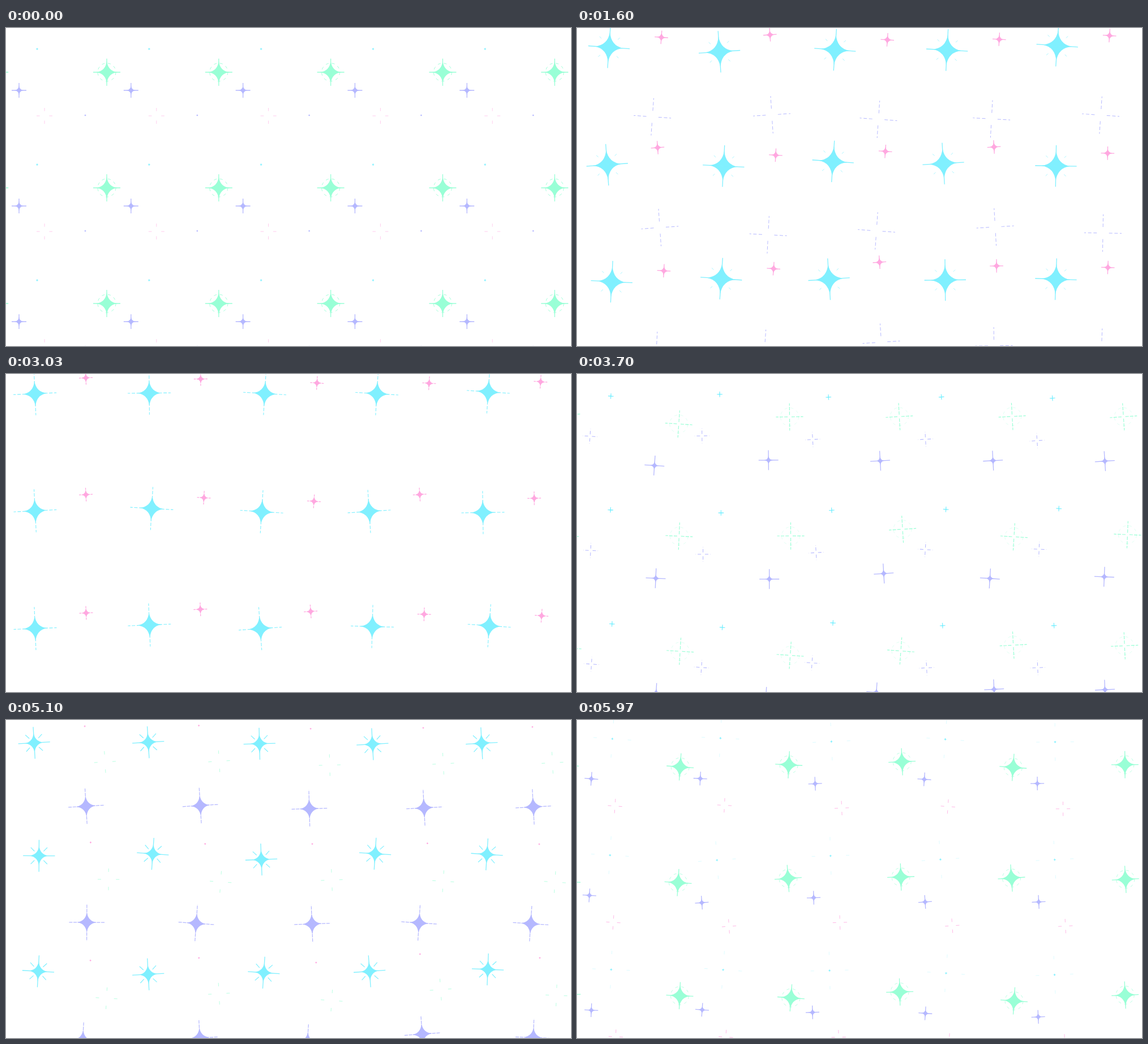
Animation, 998 px wide and 561 px high, one loop 6010 ms. Source, as an HTML page with a canvas:

```html
<!DOCTYPE html>
<html lang="en">
<head>
<meta charset="utf-8">
<title>Twinkling stars</title>
<style>
  html, body { margin: 0; width: 100%; height: 100%; overflow: hidden; background: #fff; }
  canvas { display: block; }
</style>
</head>
<body>
<canvas id="sky" width="998" height="561"></canvas>
<script>
const ctx = document.getElementById('sky').getContext('2d');
const LOOP = 6010, FRAME = 100 / 3, LAST = 179, PERIOD = 1200;
const TILE = { w: 197.8, h: 204, cx: 85, cy: 100 };
const CYAN = '#80f0ff', GREEN = '#99ffd6', LAVENDER = '#b5b8ff', PINK = '#ffa8e0';

// A star grows until `grow`, loses its core from `hold` to `gone`, and its rays scatter until `life`.
const stars = [
  { x: 55, y: 37, color: CYAN, start: 0, grow: 450, hold: 420, gone: 1130, life: 1200,
    size: 29, reach: 38, seed: 2.5, ring: 13, ringAt: 870, burst: true },
  { x: 178, y: 78, color: GREEN, start: 700, grow: 470, hold: 530, gone: 600, life: 900,
    size: 20, reach: 24, ring: 16, ringAt: 510 },
  { x: 23, y: 110, color: LAVENDER, start: 1000, grow: 200, hold: 235, gone: 295, life: 420,
    size: 8.5, reach: 13 },
  { x: 140, y: 154, color: LAVENDER, start: 1170, grow: 250, hold: 300, gone: 425, life: 600,
    size: 22, reach: 33 },
  { x: 146, y: 13, color: PINK, start: 270, grow: 140, hold: 330, gone: 570, life: 700,
    size: 9, reach: 12 },
  { x: 68, y: 155, color: PINK, start: 740, grow: 140, hold: 300, gone: 420, life: 500,
    size: 11, reach: 14 }
];

const ramp = (from, to, v) => Math.min(1, Math.max(0, (v - from) / (to - from)));
const ease = (from, to, v) => {
  const u = ramp(from, to, v);
  return u * u * (3 - 2 * u);
};
const rand = n => {
  const v = Math.sin(n * 127.1 + 3.7) * 43758.5453;
  return v - Math.floor(v);
};

function fillCore(r) {
  const k = r * 0.1, side = r * 0.94;
  ctx.beginPath();
  ctx.moveTo(0, -r);
  ctx.quadraticCurveTo(k, -k, side, 0);
  ctx.quadraticCurveTo(k, k, 0, r);
  ctx.quadraticCurveTo(-k, k, -side, 0);
  ctx.quadraticCurveTo(-k, -k, 0, -r);
  ctx.fill();
}

function spokes(from, to, width) {
  if (to <= from || width <= 0) return;
  ctx.lineWidth = width;
  ctx.beginPath();
  for (let i = 0; i < 4; i++) {
    const dx = Math.cos(i * Math.PI / 2), dy = Math.sin(i * Math.PI / 2);
    ctx.moveTo(dx * from, dy * from);
    ctx.lineTo(dx * to, dy * to);
  }
  ctx.stroke();
}

function drawStar(star, time) {
  const age = (time - star.start + PERIOD) % PERIOD;
  const grown = ease(0, star.grow, age);
  const scatter = ramp(star.hold, star.life, age);
  const core = star.size * grown ** 1.6 * (1 - ease(star.hold, star.gone, age));

  ctx.save();
  ctx.translate(star.x, star.y);
  ctx.fillStyle = ctx.strokeStyle = star.color;
  fillCore(Math.max(star.seed || 0, core));

  ctx.setLineDash(scatter > 0 ? [6, 1 + 6 * scatter] : []);
  spokes(star.reach * scatter * 0.75, star.reach * grown, 1.3 * Math.sqrt(1 - scatter));

  if (star.ring) {
    const glow = 1 - Math.abs(age - star.ringAt) / 130;
    if (glow > 0) {
      ctx.lineWidth = glow;
      ctx.setLineDash([5, 6]);
      ctx.beginPath();
      ctx.arc(0, 0, star.ring, 0, Math.PI * 2);
      ctx.stroke();
    }
  }
  if (star.burst) {
    const u = ramp(200, 500, age), from = 2 + 28 * u;
    ctx.setLineDash([]);
    ctx.rotate(Math.PI / 4);
    if (u > 0) spokes(from, from + 14 * (1 - u), 1.8 * (1 - u));
  }
  ctx.restore();
}

// Each tile sways slowly about its own centre.
function placeTile(col, row, time) {
  const id = (row + 1) * 7 + col + 1;
  const sway = (seed, size) => {
    const speed = 2.4 + 3.2 * rand(id * 5 + seed);
    const dir = rand(id * 11 + seed) < 0.5 ? -1 : 1;
    return dir * size * Math.sin(speed * time / 1000);
  };
  ctx.translate(col * TILE.w + TILE.cx + sway(1, 3), row * TILE.h + TILE.cy + sway(2, 4));
  ctx.rotate(sway(3, 0.07));
  ctx.translate(-TILE.cx, -TILE.cy);
}

function draw(time) {
  ctx.fillStyle = '#fff';
  ctx.fillRect(0, 0, 998, 561);
  for (let row = 0; row < 3; row++) {
    for (let col = -1; col < 5; col++) {
      ctx.save();
      placeTile(col, row, time);
      stars.forEach(star => drawStar(star, time));
      ctx.restore();
    }
  }
}

const begin = performance.now();
function tick() {
  const t = (performance.now() - begin) % LOOP;
  // The 4 ms allow for frame times rounded to 10 ms.
  draw(Math.min(LAST, Math.floor((t + 4) / FRAME)) * FRAME);
  requestAnimationFrame(tick);
}
tick();
</script>
</body>
</html>
```
